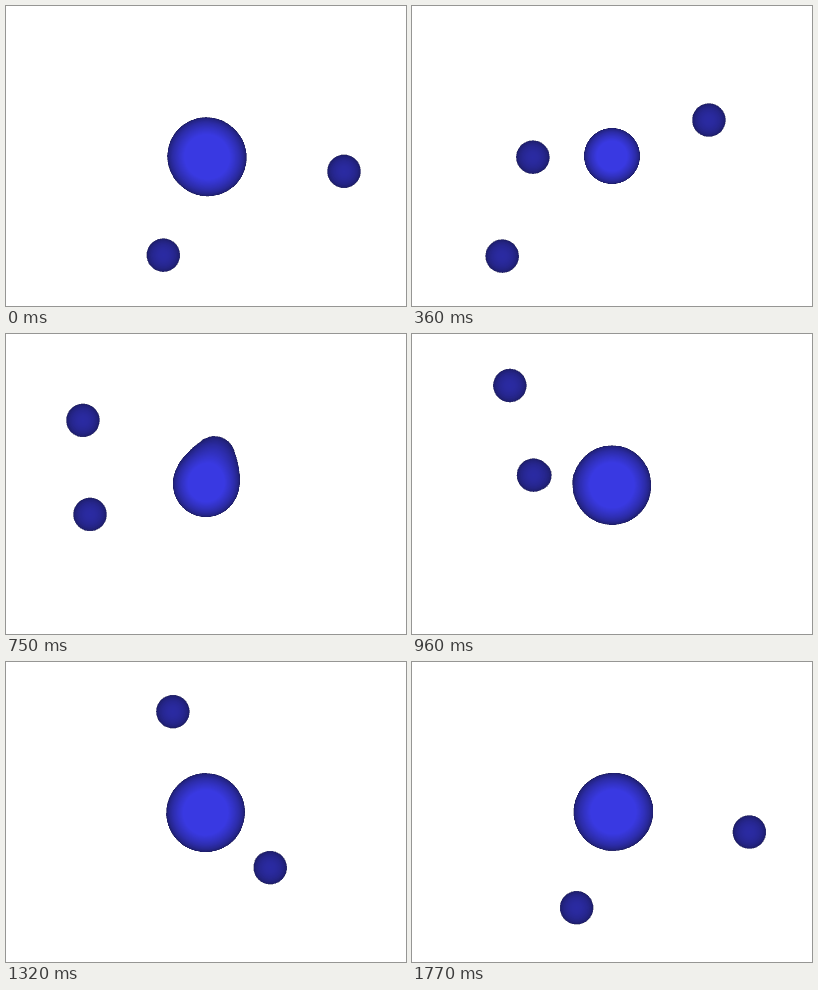
An HTML page without scripts that plays this animation: 400x300 px, repeating every 1.8 s.

```html
<!DOCTYPE html>
<html lang="en">
<head>
<meta charset="utf-8">
<title>Blobs</title>
<style>
  html, body { margin: 0; width: 100%; height: 100%; overflow: hidden; background: #fff; }
  svg { display: block; width: 100vw; height: 100vh; }
  circle { mix-blend-mode: plus-lighter; }
  stop { stop-color: #fff; }
</style>
</head>
<body>
<svg viewBox="0 0 400 300">
  <defs>
    <!-- Each ball is a bell-shaped field; the surface lies where the sum is 0.175 -->
    <radialGradient id="small">
      <stop offset="0" stop-opacity=".33"/>
      <stop offset=".1" stop-opacity=".308"/>
      <stop offset=".2" stop-opacity=".256"/>
      <stop offset=".33" stop-opacity=".175"/>
      <stop offset=".44" stop-opacity=".109"/>
      <stop offset=".6" stop-opacity=".043"/>
      <stop offset=".8" stop-opacity=".009"/>
      <stop offset="1" stop-opacity="0"/>
    </radialGradient>
    <radialGradient id="big">
      <stop offset=".29" stop-opacity="1"/>
      <stop offset=".36" stop-opacity=".69"/>
      <stop offset=".43" stop-opacity=".447"/>
      <stop offset=".5" stop-opacity=".266"/>
      <stop offset=".55" stop-opacity=".175"/>
      <stop offset=".62" stop-opacity=".092"/>
      <stop offset=".7" stop-opacity=".039"/>
      <stop offset="1" stop-opacity="0"/>
    </radialGradient>

    <!-- Cut the summed field at the surface, then colour it by height -->
    <filter id="blob" filterUnits="userSpaceOnUse" x="0" y="0" width="400" height="300"
            color-interpolation-filters="sRGB">
      <feColorMatrix values="0 0 0 1.21 -.21  0 0 0 1.21 -.21  0 0 0 1.21 -.21  0 0 0 80 -13.5"/>
      <feComponentTransfer>
        <feFuncR type="gamma" amplitude=".152" exponent=".29" offset=".075"/>
        <feFuncG type="gamma" amplitude=".152" exponent=".29" offset=".075"/>
        <feFuncB type="gamma" amplitude=".655" exponent=".29" offset=".235"/>
      </feComponentTransfer>
    </filter>
  </defs>

  <g filter="url(#blob)">
    <!-- Swells whenever a ball passes through -->
    <circle cx="200" cy="150" r="70" fill="url(#big)">
      <animate attributeName="r" dur="1.8s" repeatCount="indefinite" calcMode="spline"
        values="70;50;50;70;70;62;70" keyTimes="0;.233;.317;.517;.733;.833;1"
        keySplines=".4 0 .6 1;.4 0 .6 1;.4 0 .6 1;.4 0 .6 1;.4 0 .6 1;.4 0 .6 1"/>
    </circle>

    <circle r="50.5" fill="url(#small)">
      <animateMotion dur="1.8s" repeatCount="indefinite" calcMode="spline"
        path="M338 165.5 A47 47 0 0 0 323.5 128.5 A83 83 0 0 0 258.5 111 A121 121 0 0 0 209 121
              A42 42 0 0 0 227 188 A94 94 0 0 0 304 206 A46 46 0 0 0 338 165.5"
        keyPoints="0;.423;1" keyTimes="0;.417;1"
        keySplines=".333 .302 .667 .597;.333 .282 .667 .753"/>
    </circle>

    <circle r="50.5" fill="url(#small)">
      <animateMotion dur="1.8s" repeatCount="indefinite" calcMode="spline"
        path="M157.5 249 A61 61 0 0 1 116 262.5 A55 55 0 0 1 72.5 221 A52 52 0 0 1 84 180.5
              A83 83 0 0 1 163 132 A58 58 0 0 1 207 194 A84 84 0 0 1 157.5 249"
        keyPoints="0;.37;1" keyTimes="0;.417;1"
        keySplines=".333 .38 .667 .63;.333 .38 .667 .63"/>
    </circle>

    <circle r="50.5" fill="url(#small)">
      <animateMotion dur="1.8s" repeatCount="indefinite" calcMode="spline"
        path="M209 157 A47 47 0 0 1 154.5 164 A123 123 0 0 1 89 125.5 A56 56 0 0 1 77 85.5
              A61 61 0 0 1 130 38 A76 76 0 0 1 195 81.5 A74 74 0 0 1 209 157"
        keyPoints="0;1" keyTimes="0;1" keySplines=".333 .428 .667 .562"/>
    </circle>
  </g>
</svg>
</body>
</html>
```
